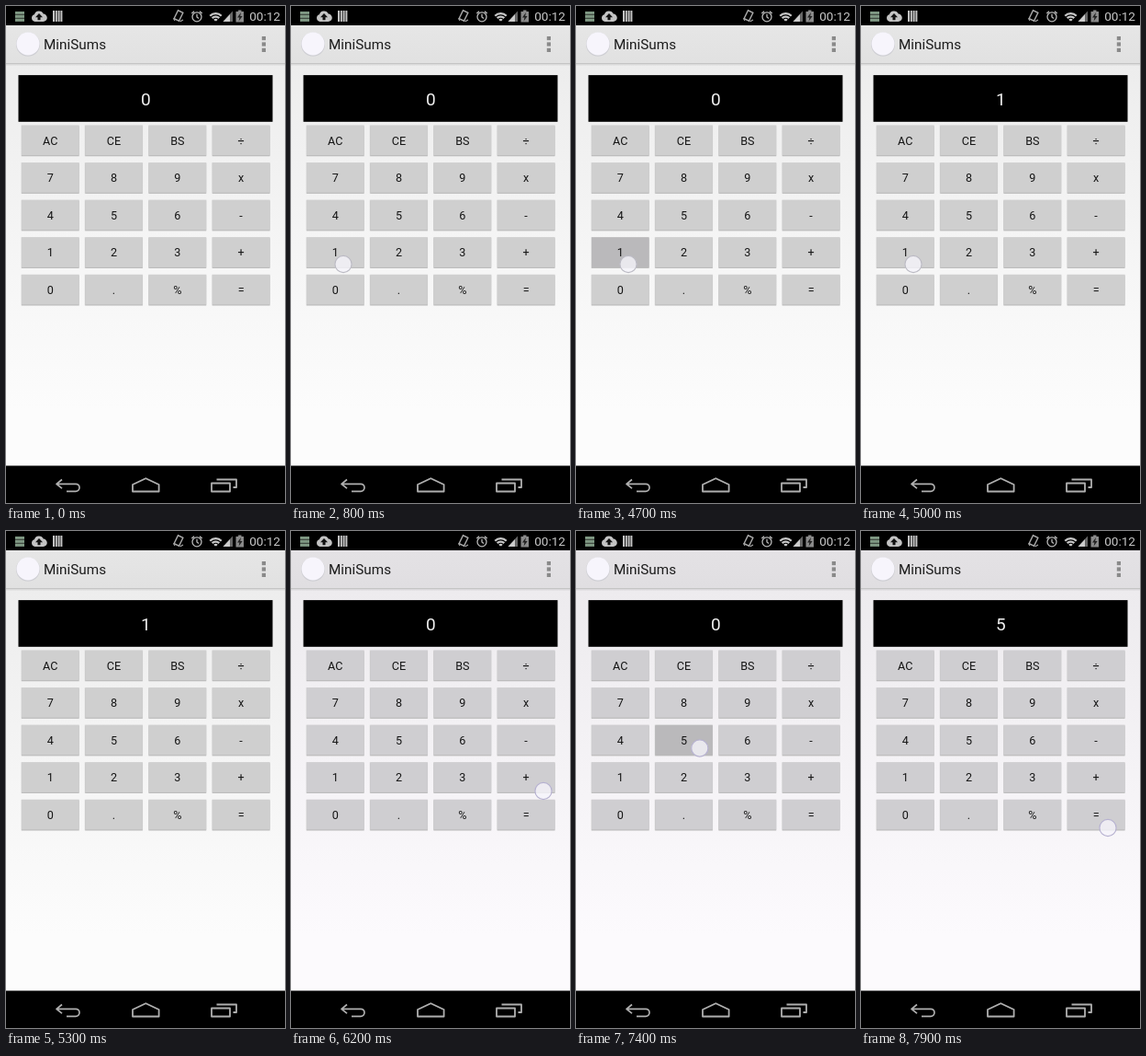
An HTML page with a canvas for the animation above (8000 ms loop, 304x540 px).

```html
<!DOCTYPE html>
<html lang="en">
<head>
<meta charset="utf-8">
<title>Calculator</title>
<style>
html, body { margin: 0; width: 100%; height: 100%; overflow: hidden; background: #000; }
canvas { display: block; width: 304px; height: 540px; }
</style>
</head>
<body>
<canvas id="stage"></canvas>
<script>
const W = 304, H = 540, LOOP = 8000;
const canvas = document.getElementById('stage');
const ctx = canvas.getContext('2d');
const dpr = window.devicePixelRatio || 1;
canvas.width = W * dpr;
canvas.height = H * dpr;

const KEYS = ['AC', 'CE', 'BS', '÷', '7', '8', '9', 'x', '4', '5', '6', '-',
  '1', '2', '3', '+', '0', '.', '%', '='];

// Each touch: visible from..to, key held down..up
const TOUCHES = [
  { key: '1', x: 57, y: 280.5, from: 700, to: 5100, down: 4600, up: 4900 },
  { key: '+', x: 275, y: 282.5, from: 5900, to: 6300, down: 6000, up: 6200 },
  { key: '5', x: 134.8, y: 236, from: 7200, to: 7700, down: 7300, up: 7600 },
  { key: '=', x: 269, y: 322.5, from: 7800, to: 8000, down: 8000, up: 8000 }
];
const DISPLAY = [[0, '0'], [4900, '1'], [6200, '0'], [7600, '5']];

const within = (t, a, b) => t >= a && t < b;

function rect(x, y, w, h, color) {
  ctx.fillStyle = color;
  ctx.fillRect(x, y, w, h);
}

function fade(y0, y1, top, bottom) {
  const g = ctx.createLinearGradient(0, y0, 0, y1);
  g.addColorStop(0, top);
  g.addColorStop(1, bottom);
  return g;
}

function text(str, x, y, size, color, align = 'center') {
  ctx.font = `${size}px Roboto, sans-serif`;
  ctx.textAlign = align;
  ctx.textBaseline = 'alphabetic';
  ctx.fillStyle = color;
  ctx.fillText(str, x, y);
}

function disc(x, y, r, color) {
  ctx.fillStyle = color;
  ctx.beginPath();
  ctx.arc(x, y, r, 0, 7);
  ctx.fill();
}

function line(path, color, width = 1.5) {
  ctx.strokeStyle = color;
  ctx.lineWidth = width;
  ctx.stroke(new Path2D(path));
}

function shape(path, color) {
  ctx.fillStyle = color;
  ctx.fill(new Path2D(path));
}

function wifi(x, y) {
  for (let r = 2; r < 12; r += 3.4) {
    ctx.beginPath();
    ctx.arc(x, y, r, -Math.PI * 0.75, -Math.PI * 0.25);
    ctx.strokeStyle = '#c8c8c8';
    ctx.lineWidth = 2.3;
    ctx.stroke();
  }
}

function statusBar() {
  rect(0, 0, W, 21, '#000');
  rect(10, 6, 10, 11, '#3f4a41');
  for (let i = 0; i < 3; i++) rect(10, 6 + i * 4, 10, 2.8, '#7f9883');

  const c = '#c4c4c4';
  shape('M31.5 17a4 4 0 0 1-.6-7.8a5.2 5.2 0 0 1 9.8-.6a4.2 4.2 0 0 1-.2 8.4z', c);
  shape('M36 8l4 4.2h-2.5v3h-3v-3H32z', '#111');
  for (let i = 0; i < 4; i++) rect(51 + i * 2.8, 5, 2, 12, c);

  ctx.save();
  ctx.translate(188, 10.5);
  ctx.rotate(0.45);
  ctx.strokeStyle = '#aaa';
  ctx.lineWidth = 1.4;
  ctx.strokeRect(-3, -5, 6, 10);
  ctx.restore();
  line('M182.5 13.5l1.5 2.5M189.5 17l3.5-2', '#aaa', 1.1);

  line('M203 11.8a5 5 0 1 0 10 0a5 5 0 1 0-10 0M208 8.8v3.2l2 1.5M202.3 8l2.8-2.3M213.7 8l-2.8-2.3', '#bbb', 1.3);
  wifi(228.5, 17);
  shape('M236.5 17H247V5.5z', '#666');
  shape('M236.5 17H244V9z', '#ccc');
  shape('M250.5 6h2.6V4.5h3.4V6H259v11.5h-8.5z', '#8a8a8a');
  shape('M256 7l-4 5.5h2.4l-.8 4l4-5.5h-2.4z', '#222');
  text('00:12', 299, 16, 13.6, '#c8c8c8', 'right');
}

function actionBar(tint) {
  rect(0, 21, W, 41, fade(21, 62, tint ? '#e4e2e5' : '#e6e6e6', tint ? '#e0dee1' : '#e1e1e1'));
  rect(0, 62, W, 1, '#c4c4c4');
  rect(0, 63, W, 2.5, fade(63, 65.5, 'rgba(0,0,0,.1)', 'rgba(0,0,0,0)'));
  disc(24, 41.8, 13, '#cfcfd4');
  disc(24, 41, 12.5, '#f7f5fc');
  text('MiniSums', 41, 47, 15.3, '#1c1c1c', 'left');
  for (let i = 0; i < 3; i++) rect(278.8, 33 + i * 6.4, 4.2, 4.2, '#8a8a8a');
}

function button(label, i, pressed, tint) {
  const x = 17 + (i % 4) * 69.3, y = 129.6 + Math.floor(i / 4) * 40.55;
  const face = pressed ? '#bab9bb' : tint ? '#cfced1' : '#cfcfcf';
  rect(x - 0.6, y, 63.4, 33.6, '#dadada');
  rect(x, y + 1, 62.5, 32.6, '#b8b8b8');
  rect(x, y, 62.5, 32.6, face);
  text(label, x + 31.2, y + 21.2, 12.6, '#161616');
}

function navBar() {
  rect(0, 499.5, W, 40.5, '#000');
  ctx.lineJoin = 'round';
  const c = '#b0b0b0';
  line('M61 514.5l-6 4.8l6 4.8M55.5 519.3H76a4 4 0 0 1 0 8H66', c, 1.7);
  line('M138 527.5V520L152.3 513.2L166.6 520V527.5z', c, 1.8);
  line('M224 518.5h20v9h-20z', c, 1.8);
  line('M229.5 514.5H251V523h-3.5', c, 1.8);
  ctx.lineJoin = 'miter';
}

function pointer(p, tint) {
  disc(p.x, p.y, 9.3, 'rgba(245,244,250,.8)');
  ctx.strokeStyle = tint ? '#b6b1d0' : '#bbbac3';
  ctx.lineWidth = 1.2;
  ctx.beginPath();
  ctx.arc(p.x, p.y, 9.1, 0, 7);
  ctx.stroke();
}

function draw(t) {
  const tint = t >= 5400;
  ctx.setTransform(dpr, 0, 0, dpr, 0, 0);
  rect(0, 62, W, 438, fade(62, 440, tint ? '#edebee' : '#ededed', tint ? '#fcfafd' : '#fcfcfc'));
  statusBar();
  actionBar(tint);
  rect(13.5, 75.1, 277, 50.7, '#000');
  const shown = DISPLAY.filter(d => d[0] <= t).pop()[1];
  text(shown, 152.3, 108, 19, '#f0f0f0');
  KEYS.forEach((k, i) => {
    const pressed = TOUCHES.some(p => p.key === k && within(t, p.down, p.up));
    button(k, i, pressed, tint);
  });
  navBar();
  TOUCHES.filter(p => within(t, p.from, p.to)).forEach(p => pointer(p, tint));
}

const start = performance.now();
function frame() {
  const t = (performance.now() - start) % LOOP;
  draw(Math.floor(t / 100) * 100);
  requestAnimationFrame(frame);
}
frame();
</script>
</body>
</html>
```
